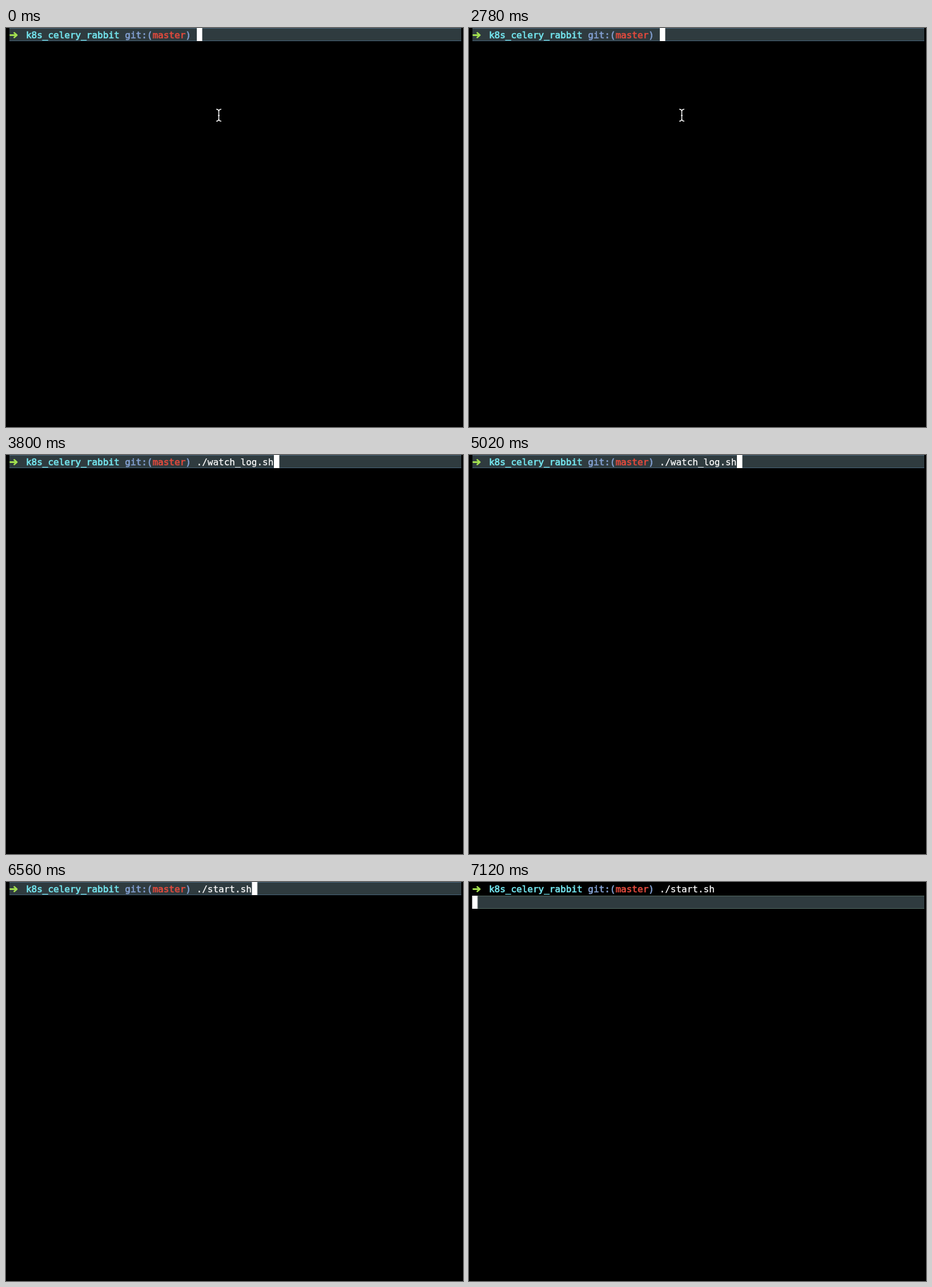
Write an HTML page that moves like this. It is 800 px wide and 700 px high and loops after 8 s.

```html
<!DOCTYPE html>
<html lang="en">
<head>
<meta charset="utf-8">
<title>Terminal</title>
<style>
  html, body { margin: 0; width: 100%; height: 100%; overflow: hidden; background: #000; }
  svg { display: block; width: 800px; height: 700px; }
  text {
    font: 16px "DejaVu Sans Mono", "Liberation Mono", monospace;
    fill: currentColor; stroke: currentColor; stroke-width: 0.25; color: #fff; white-space: pre;
  }
  .prompt { stroke-width: 0.7; }
  .dir { color: #74e5ee; }
  .git { color: #829fd0; }
  .branch { color: #e04a3d; }
  .arrow { fill: none; stroke: #a3e04f; stroke-width: 2.8; stroke-linecap: round; stroke-linejoin: round; }
  .mouse { fill: none; stroke: #fff; stroke-width: 1.5; }
  .guide { fill: #2f3b3f; stroke: #48647a; }
  .block { fill: #fff; }

  .guide, .block, .mouse, .watch, .start { animation: 8s step-end infinite; }
  .guide { animation-name: guide; }
  .block { animation-name: block; }
  .mouse { animation-name: mouse; }
  .watch { animation-name: watch; }
  .start { animation-name: start; }

  /* 35%: first history entry, 66%: second entry, 82.25%: Enter */
  @keyframes mouse { 0% { opacity: 1; } 35%, 100% { opacity: 0; } }
  @keyframes watch { 0% { opacity: 0; } 35% { opacity: 1; } 66%, 100% { opacity: 0; } }
  @keyframes start { 0% { opacity: 0; } 66%, 100% { opacity: 1; } }
  @keyframes guide {
    0% { transform: none; stroke: #48647a; }
    82.25%, 100% { transform: translateY(24px); stroke: #526961; }
  }
  @keyframes block {
    0% { transform: translate(334px, 0); }
    35% { transform: translate(469px, 0); }
    66% { transform: translate(430.5px, 0); }
    82.25%, 100% { transform: translate(5.5px, 24px); }
  }
</style>
</head>
<body>
<svg viewBox="0 0 800 700">
  <g class="guide">
    <rect x="6" width="791" height="23" stroke="none"/>
    <path d="M6 0.5H797M6 22.5H797"/>
  </g>
  <path class="arrow" d="M7.5 12.5H18M14.5 8.5L19 12.5L14.5 16.5"/>
  <text class="prompt" x="34.9" y="18"><tspan class="dir">k8s_celery_rabbit</tspan> <tspan class="git">git:(</tspan><tspan class="branch">master</tspan><tspan class="git">)</tspan></text>
  <text class="watch" x="333.5" y="18">./watch_log.sh</text>
  <text class="start" x="333.5" y="18">./start.sh</text>
  <rect class="block" width="9.5" height="23"/>
  <path class="mouse" d="M368 142.5Q372.5 142.5 372.5 147Q372.5 142.5 377 142.5M372.5 146V160M368 163.5Q372.5 163.5 372.5 159Q372.5 163.5 377 163.5M371 153.5H374"/>
</svg>
</body>
</html>
```
